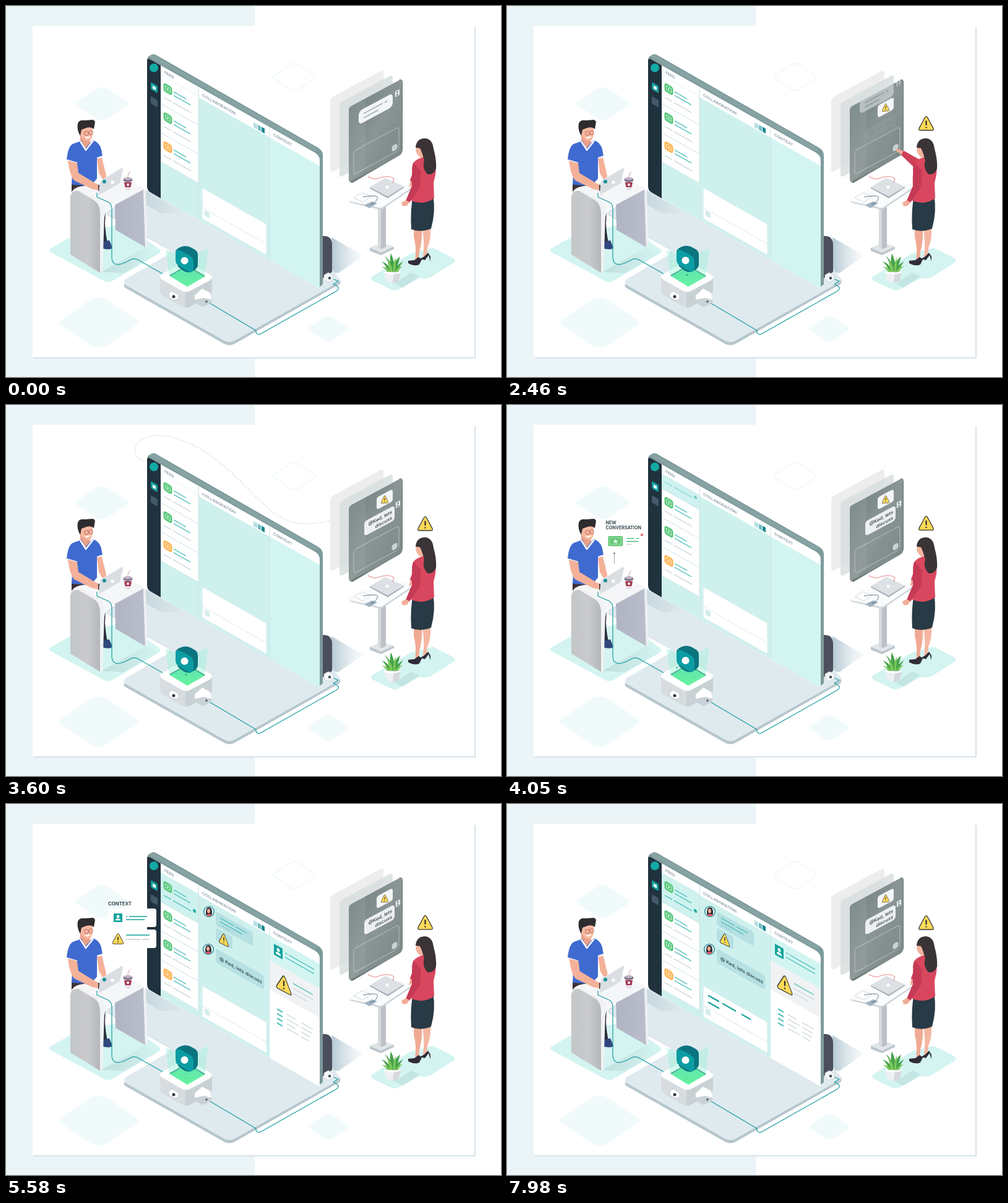
An HTML page that plays this animation: 800x600 px, repeating every 8000 ms.

```html
<!DOCTYPE html>
<html lang="en">
<head>
<meta charset="utf-8">
<title>Team workspace</title>
<style>
html, body { margin: 0; height: 100%; overflow: hidden; background: #fff; }
svg { display: block; width: 800px; height: 600px; font-family: Inter, sans-serif; }
path { stroke-linejoin: round; }
</style>
</head>
<body>
<svg viewBox="0 0 800 600">
<defs>
  <linearGradient id="legFill"><stop stop-color="#c4c6c8"/><stop offset=".55" stop-color="#c9cacc"/><stop offset="1" stop-color="#b3b5b9"/></linearGradient>
  <linearGradient id="backLeg"><stop stop-color="#b0b4c3"/><stop offset="1" stop-color="#babecb"/></linearGradient>
  <linearGradient id="glass" x2="1" y2="1"><stop stop-color="#738282"/><stop offset=".5" stop-color="#8a9594"/><stop offset="1" stop-color="#7c8a89"/></linearGradient>
  <linearGradient id="beam" x2="0" y2="1"><stop stop-color="#a9f1e4" stop-opacity=".5"/><stop offset="1" stop-color="#7df3c3" stop-opacity=".35"/></linearGradient>
  <linearGradient id="glow" x2="0" y2="1"><stop stop-color="#3bd693"/><stop offset="1" stop-color="#5af58d"/></linearGradient>
  <linearGradient id="shade"><stop stop-color="#b3c8d2"/><stop offset="1" stop-color="#e6eff3" stop-opacity=".3"/></linearGradient>
  <linearGradient id="floorShade"><stop stop-color="#9fb9c0" stop-opacity=".75"/><stop offset="1" stop-color="#9fb9c0" stop-opacity="0"/></linearGradient>
  <clipPath id="feedClip"><path d="M21 15H82V215H21Z"/></clipPath>
  <clipPath id="tabletClip"><rect width="86" height="122" rx="5"/></clipPath>
  <mask id="reveal" maskUnits="userSpaceOnUse" x="0" y="0" width="800" height="600">
    <path id="revealPath" pathLength="1" fill="none" stroke="#fff" stroke-width="6"/>
  </mask>
  <g id="warn">
    <path d="M-1.9-10Q0-12.6 1.9-10L11.4 7.600Q12.800 11 9.500 11H-9.500Q-12.800 11-11.4 7.600Z" fill="#ffda57" stroke="#3b3a38" stroke-width="1.3"/>
    <path d="M0-4.5V3M0 5.400V7.600" stroke="#2f2f30" stroke-width="2.2"/>
  </g>
  <g id="person">
    <rect x="-7" y="-7" width="14" height="14" rx="1" fill="#16a39c"/>
    <circle cy="-2" r="2.4" fill="#fff"/><path d="M-4.2 4.3Q-4 .8 0 1.2Q4 .8 4.2 4.3Z" fill="#fff"/>
  </g>
  <g id="avatar">
    <circle r="9" fill="#177f88"/><circle r="7.7" fill="#e6f8f7"/>
    <path d="M-4.8 5Q-6-7 0-7Q6-7 4.8 5Z" fill="#302d33"/>
    <ellipse cx="-.5" cy="-1" rx="2.4" ry="3.6" fill="#f4b39b"/>
    <path d="M-4.500 6Q-2 3 0 3.500Q3 3 4.500 6Q0 9-4.500 6Z" fill="#dc4f65"/>
  </g>
</defs>

<path d="M0 0H402V600H0Z" fill="#ebf4f6"/>
<path d="M45 34H759V570H45Z" fill="#d7e4ea"/>
<path d="M43 32H757V568H43Z" fill="#fff"/>
<g id="diamonds"></g>

<!-- floors -->
<g fill="#d3f4f0">
  <path d="M72 392L112 369L190 352L246 392Q253 396 246 401L173 444Q165 449 157 444L72 398Q68 395 72 392Z"/>
  <path d="M592 437L655 400L690 391L723 408Q729 412 722 416L687 438Q680 442 668 440L635 458Q628 462 621 458L592 444Q588 440 592 437Z"/>
</g>
<path d="M155 430L225 390L247 400L190 432Z" fill="url(#floorShade)" opacity=".5"/>
<path d="M526 374L577 404L537 432L526 430Z" fill="url(#shade)"/>

<!-- stage -->
<path d="M193 448L262 405L265 395L164 338V332L225 298L510 405L537 440Q543 444 539 450L370 546Q361 551 352 546L193 456Q188 452 193 448Z" fill="#b6c6cd"/>
<path d="M193 442L262 402Q268 398 262 393L160 335L225 298L510 405L537 438Q543 442 537 447L370 541Q361 546 352 541L193 451Q188 446 193 442Z" fill="#dfeaef"/>
<path d="M226 299L290 335L250 335L224 320Z" fill="url(#floorShade)" opacity=".5"/>
<path d="M512 372Q526 371 527 385V430L512 440Z" fill="#4b4e5c"/>

<!-- main screen -->
<path d="M228 88Q228 82 233 80Q238 76 244 80L504 229Q512 234 512 241V450L506 455L500 250Z" fill="#7e9b9c"/>
<path d="M231 82L238 79L504 231L499 235Z" fill="#88a3a3"/>
<g transform="matrix(1 .567 0 1 229 84)">
  <path d="M4 0H270Q278 0 278 8V215H5Q-1 215-1 208V5Q-1 0 4 0Z" fill="#fff"/>
  <path d="M4 0H21V215H5Q-1 215-1 208V5Q-1 0 4 0Z" fill="#20323e"/>
  <path d="M21 15H82V215H21ZM83 17H197V215H83Z" fill="#cff1ee"/>
  <path d="M197 17H278V215H197Z" fill="#d3f5f2"/>
  <path d="M82.5 0V215M197 0V215" stroke="#c6dcdf" stroke-width=".8"/>
  <g font-size="6.2" font-weight="600" fill="#86949f">
    <text x="27" y="10">FEED</text><text x="88" y="12" letter-spacing=".1">COLLABORATION</text><text x="203" y="11">CONTEXT</text>
  </g>
  <path d="M171 7H177V15H171Z" fill="#b5dfe2"/><path d="M178 7H183V15H178Z" fill="#6fbcc0"/><path d="M184 7H189V15H184Z" fill="#17888c"/>
  <rect x="5" y="36" width="11" height="12" rx="2" fill="#139f9d"/><path d="M8 40H13V45H8Z" fill="#fff"/>
  <rect x="5" y="59" width="11" height="12" rx="2" fill="#43596a"/>
  <g clip-path="url(#feedClip)"><g id="oldCards"></g><g id="newCard"></g></g>
  <g>
    <rect x="88" y="160" width="104" height="50" rx="2" fill="#fff" stroke="#d4e9eb" stroke-width=".7"/>
    <path d="M88 192H192" stroke="#cfe2e5" stroke-width=".8"/>
    <rect x="92" y="194" width="8" height="9" rx="2" fill="#d3edec"/>
    <g id="draft"></g>
  </g>
  <g id="context"></g>
  <g id="messageA">
    <rect x="110" y="27" width="60" height="23" rx="4" fill="#b6e0e2"/>
    <g id="messageLines"></g>
  </g>
  <g id="messageB"><rect x="110" y="53" width="27" height="21" rx="4" fill="#b6e0e2"/></g>
  <g id="messageC">
    <rect x="110" y="87" width="78" height="23" rx="4" fill="#b6e0e2"/>
    <text x="116" y="102" font-size="7.4" font-weight="500" fill="#22343f">@ Ked, lets discuss</text>
  </g>
</g>
<circle cx="239" cy="100" r="7" fill="#13aaa5"/>
<g id="messageIcons">
  <use href="#avatar" x="328" y="174"/><use href="#avatar" x="327" y="235"/>
  <use href="#warn" transform="translate(352 219) skewY(25) scale(.65 .78)"/>
</g>
<use id="contextWarn" href="#warn" transform="translate(449 291) skewY(28) scale(1 1.12)"/>

<!-- cables and connector -->
<path d="M325 478L401 523Q405 525 404 528Q406 533 412 530L534 461Q540 457 535 453L529 450L537 445L523 439" fill="none" stroke="#1a9d9e" stroke-width="1.2"/>
<path d="M514 435L521 431L529 436V443L521 447L514 443Z" fill="#f3f5f6" stroke="#c2cbd0" stroke-width=".6"/>
<circle cx="523" cy="440" r="2.2" fill="#42505c"/>

<!-- projector -->
<path d="M249 438V461Q249 466 255 469L282 485Q290 490 298 486L327 469Q333 466 333 460V438Z" fill="#d6dcdf"/>
<path d="M290 462L333 438V460Q333 466 327 469L298 486Q294 488 290 488Z" fill="#c8d1d4"/>
<path d="M253 433L283 416Q291 412 299 416L329 434Q337 439 329 444L299 460Q291 465 283 460L253 443Q245 438 253 433Z" fill="#fff"/>
<path d="M264 436L292 420L322 437L293 454Z" fill="url(#glow)"/>
<path d="M265 436L284 425M301 425L321 437" stroke="#157466" stroke-width="1.5"/>
<path d="M263 464L269 461L279 467V474L272 476L263 471Z" fill="#fff" stroke="#aab0b8" stroke-width=".6"/><circle cx="271" cy="470" r="2.5" fill="#33373d"/>
<path d="M305 468L317 457L330 464L332 477L318 486L305 479Z" fill="#fff"/><path d="M305 475L320 472L332 475V480L318 487L305 480Z" fill="#c9d2d6"/><circle cx="324" cy="478" r="1.8" fill="#53606a"/>
<path d="M258 394L292 409L293 454L264 437Z" fill="url(#beam)"/><path d="M327 391L292 409L293 454L321 437Z" fill="url(#beam)"/>
<g id="dots" fill="#13a882"><circle r="1.3"/><circle r="1.3"/></g>
<g id="cube">
  <path d="M274 397Q277 391 287 389Q293 388 299 391L306 395Q310 398 310 403V420Q309 425 304 428L298 431Q293 432 287 429L278 422Z" fill="#0b747f"/>
  <path d="M274 399Q275 393 282 396L297 404Q303 408 303 414V425Q302 433 295 430L280 421Q274 418 274 411Z" fill="#0c9da3"/>
  <circle cx="288.5" cy="412.5" r="6" fill="#fff"/>
</g>

<!-- man at desk -->
<path d="M151 330H161L160 352Q161 370 164 382L153 384Z" fill="#2e303c"/>
<path d="M153 374L158 381L167 379L172 391Q168 396 153 391Z" fill="#30477e"/>
<path d="M176 321L222 296L225 390L177 362Z" fill="url(#backLeg)"/>
<path d="M222 296L226 299L229 388L225 390Z" fill="#eef0f3"/>
<path d="M106 287H148V302H106Z" fill="#3d3135"/>
<path d="M104 307Q106 293 125 291L190 278L222 294Q223 297 220 298L166 327Q161 330 159 342L150 330Z" fill="#f5f6f8"/>
<path d="M104 308Q106 296 122 300L144 312Q154 318 154 334L153 432L104 402Z" fill="url(#legFill)"/>
<path d="M122 298L148 312Q160 319 159 338L156 429L152 433V340Q153 321 142 314L118 300Z" fill="#f0f2f3"/>
<path d="M147 302V309L165 317Q171 320 171 328V408Q172 419 183 418Q192 416 202 410Q209 407 216 412L253 433" fill="none" stroke="#1a9d9e" stroke-width="1.2"/>
<path d="M120 208L134 212L137 224L128 234L120 222Z" fill="#eaa089"/>
<path d="M108 223L122 218L128 230L140 217Q151 220 154 232L156 243L147 247V279L137 291L106 289Q108 264 105 250L98 249Q100 227 108 223Z" fill="#3f6acf"/>
<path d="M120 219L129 233L141 218" fill="none" stroke="#fff" stroke-width="2.4"/>
<path d="M98 249L115 254M147 246L156 243" stroke="#f2f5fd" stroke-width="2"/>
<path d="M119 198Q121 190 134 191L140 196V208Q139 218 132 218Q122 217 119 203Z" fill="#f7baa2"/>
<path d="M116 190Q118 184 127 185L141 184L144 187L142 199Q138 195 130 197L122 200L120 210Q114 200 116 190Z" fill="#2e2c2f"/>
<g fill="none" stroke="#a74e49" stroke-width=".8"><circle cx="130" cy="206" r="3.4"/><circle cx="137" cy="205" r="3.2"/></g>
<path d="M127 212Q132 217 137 211Z" fill="#fff"/>
<g id="manArms" fill="#f4b199">
  <path d="M100 250L115 254L117 270L145 287L154 291L149 298L139 296L110 282Q103 274 100 250Z"/>
  <path d="M147 247L155 245L161 270Q164 280 157 282L150 270Z"/>
</g>
<path d="M149 289L153 290V301L149 299Z" fill="#33363e"/>
<path d="M152 283L187 262Q190 262 189 265L184 287L150 306Z" fill="#dadde2" stroke="#f1f3f5" stroke-width=".7"/>
<circle cx="159" cy="284" r="3" fill="#15939a"/><circle cx="172" cy="285" r="2.7" fill="#fff"/>
<path d="M190 281L193 297Q197 300 201 297L204 281Z" fill="#e4dfe8"/>
<path d="M191 285L192.500 293H201.500L203 285Z" fill="#a63b54"/><circle cx="197" cy="289" r="2" fill="#fff"/>
<ellipse cx="197" cy="281" rx="7.5" ry="3.7" fill="#796b83"/><ellipse cx="197" cy="279.500" rx="6" ry="2.500" fill="#b9afc2"/><path d="M196 280L198 271L201 268" fill="none" stroke="#d6b8bc" stroke-width="1.2"/>

<!-- tablet -->
<g transform="matrix(1 -.54 0 1 524 149)"><rect width="86" height="121" rx="5" fill="#ededee"/></g>
<g transform="matrix(1 -.54 0 1 539 157)"><rect width="86" height="121" rx="5" fill="#d9dfdf" opacity=".85"/></g>
<path d="M636 119Q641 118 641 124V232Q641 238 635 242L560 286L556 285Z" fill="#687777"/>
<g transform="matrix(1 -.54 0 1 554 164)">
  <rect width="86" height="122" rx="5" fill="url(#glass)"/>
  <path d="M0 0H27V115L0 122Z" fill="#a4adad" opacity=".25"/>
  <g clip-path="url(#tabletClip)">
    <g id="firstBubble">
      <rect x="16" y="15" width="55" height="22" rx="6" fill="#f2f5f6"/>
      <path d="M24 23H55M58 23H62M24 30H48" stroke="#aab4b6" stroke-width="2"/>
      <rect x="75" y="15" width="7" height="9" fill="#eef2f2"/><circle cx="78.5" cy="18" r="1.5" fill="#78898a"/><path d="M76 23Q78.5 18 81 23Z" fill="#78898a"/>
    </g>
    <g id="alertBubble"><rect x="45" y="10" width="26" height="20" rx="4" fill="#f3f5f6"/><use href="#warn" transform="translate(58 20) skewY(24) scale(.48 .54)"/></g>
    <g id="textBubble">
      <rect x="25" y="38" width="49" height="24" rx="5" fill="#eceff0"/>
      <g font-size="7.5" font-weight="500" fill="#28363f" text-anchor="end"><text x="70" y="49">@Ked, lets</text><text x="70" y="58.5">discuss</text></g>
      <rect x="76" y="35" width="7" height="9" fill="#eef2f2"/><circle cx="79.5" cy="38" r="1.5" fill="#78898a"/><path d="M77 43Q79.5 38 82 43Z" fill="#78898a"/>
    </g>
  </g>
  <rect x="8" y="75" width="73" height="38" rx="4" fill="none" stroke="#c3cccc" stroke-width=".8"/>
  <rect x="69.5" y="100" width="9" height="10" rx="4" fill="#c9d1d2"/>
</g>

<!-- side table -->
<path d="M588 391L607 384L627 390V393L606 403L588 396Z" fill="#bdc6cc"/><path d="M588 391L607 383L627 389L606 399Z" fill="#e1e6e9"/>
<path d="M601 320H614V390L607 393L601 390Z" fill="#bcc1c7"/><path d="M601 320H606V392L601 390Z" fill="#d7dade"/>
<path d="M555 314L606 287L655 290V297L609 328Q604 331 599 328L556 318Z" fill="#cdd5da"/>
<path d="M555 312L606 285L655 288V294L609 325Q604 328 599 325L556 316Z" fill="#fafbfc"/>
<path d="M588 293L613 278L643 292L617 308Z" fill="#dde1e5"/><path d="M588 293L617 308L643 292V294L617 311L588 295Z" fill="#a9b2ba"/><circle cx="616" cy="293" r="2.5" fill="#fff"/>
<path d="M562 310L575 302L590 308L577 317Z" fill="#fff" stroke="#c5ced5" stroke-width=".8"/><path d="M579 322L592 316L600 319L587 327Z" fill="#9fb3c2"/><path d="M577 309Q604 304 600 312T589 321" fill="none" stroke="#415b69" stroke-width=".8"/>
<path d="M586 270V277L597 280Q618 272 627 279L625 286" fill="none" stroke="#e38683"/>
<path d="M582 273L589 269V273L582 277Z" fill="#fff"/>

<!-- woman -->
<g id="raisedArm">
  <path d="M636 233L628 230L630 235L637 240L643 241L645 236Z" fill="#f3ad98"/>
  <path d="M641 234L666 248L676 255L670 267L660 263L637 241Z" fill="#cf4059"/>
</g>
<path d="M659 360H672Q673 381 668 398L667 413H661Q664 390 659 374Z" fill="#f0aa94"/><path d="M673 360H686Q687 378 681 391L680 405H674Q677 385 673 360Z" fill="#f5b7a1"/>
<path d="M650 412L660 411L667 406L672 410L668 418Q661 422 650 416ZM669 409L676 405L682 399L686 405V413L683 403L677 411Z" fill="#302c38"/>
<path d="M658 306H690Q695 331 687 360Q670 367 655 361Q653 329 658 306Z" fill="#273a45"/>
<path d="M664 223Q670 218 680 226L677 247L668 244L664 239L662 234Z" fill="#f4b49e"/>
<path d="M662 250Q675 241 690 247Q696 250 694 273L691 286L692 311Q675 323 655 315L658 285L656 263Q657 253 662 250Z" fill="#d9475f"/>
<path d="M658 253Q655 275 656 291L646 315L652 318L669 293L671 267Z" fill="#c53a55"/>
<path d="M646 314L639 318L641 324L648 323L652 317Z" fill="#f3ad98"/>
<path d="M662 229Q663 215 676 214Q689 214 691 231Q696 249 695 263Q691 274 681 272Q672 262 676 250Q672 235 669 230Z" fill="#3a3436"/>
<use id="alarm" href="#warn"/>

<!-- plant -->
<path d="M628 449L655 431L668 437L641 456Z" fill="#b9dedd" opacity=".6"/>
<g fill="#45a34b"><path d="M617 430Q616 421 607 413Q619 417 623 430ZM620 430Q620 415 612 404Q624 414 626 430ZM622 430Q619 412 622 400Q629 414 628 430ZM625 430Q626 413 637 405Q633 418 631 430ZM628 430Q631 418 642 413Q635 421 633 430Z"/><path d="M616 430Q613 424 607 422Q616 421 621 430ZM621 430Q617 419 617 411Q625 420 625 430ZM626 430Q625 415 630 407Q630 420 629 430ZM629 430Q633 421 641 421Q635 425 634 430Z" fill="#7cc65a"/></g>
<path d="M611 430H638L635 444Q625 451 614 444Z" fill="#eff0f1"/><path d="M627 430H638L635 444Q630 448 625 448Z" fill="#d5d8dc"/><path d="M611 430Q624.500 436 638 430" fill="none" stroke="#fff" stroke-width="2"/>

<path id="route" d="M522 187C480 197 455 192 430 172C395 143 375 115 335 85C300 58 255 43 228 52C202 61 203 84 224 91" fill="none" stroke="#c8d1d6" stroke-width="1.1" stroke-dasharray="2 2.4" mask="url(#reveal)"/>

<g id="conversation">
  <g font-size="7.5" font-weight="600" fill="#24343d"><text x="159" y="190">NEW</text><text x="159" y="199">CONVERSATION</text></g>
  <rect x="159" y="205" width="60" height="28" rx="4" fill="#fff"/>
  <rect x="163" y="210" width="25" height="17" rx="2" fill="#67c878"/><rect x="166" y="213" width="19" height="11" fill="none" stroke="#a5e2ae"/><path d="M175.500 215L177 218H180L177.500 220L178.500 223L175.500 221L172.500 223L173.500 220L171 218H174Z" fill="#e3f7e4"/>
  <path d="M194 214H207M210 214H215M194 219H214" stroke="#5cc382" stroke-width="1.7"/><path d="M194 224H203" stroke="#cfd9dc" stroke-width="1.5"/>
  <circle cx="220" cy="208" r="2.4" fill="#ef7886"/>
  <path d="M173.500 239V257" stroke="#7c8b92" stroke-width=".8"/><circle cx="173.500" cy="239" r="1.4" fill="#586972"/>
</g>
<g id="contextCards">
  <text x="0" y="-36" font-size="7.8" font-weight="600" fill="#24343d">CONTEXT</text>
  <g id="contextPlates"><rect y="-31" width="78" height="30" rx="4"/><rect y="3" width="78" height="30" rx="4"/></g>
  <use href="#person" x="16" y="-16"/><use href="#warn" transform="translate(16 18) scale(.75)"/>
  <path d="M29-18H31M34-18H63M29-13H59M29 12H67" stroke="#16a39c" stroke-width="1.7"/>
  <path d="M29 19H52M55 19H67" stroke="#c4ced3" stroke-width="1.6"/>
</g>
</svg>
<script>
const $ = id => document.getElementById(id);
const TEAL = '#4bbfba', GREY = '#cbd6da';
const dash = (x1, x2, y, color = TEAL, width = 1.5) =>
  `<path d="M${x1} ${y}H${x2}" stroke="${color}" stroke-width="${width}"/>`;

const diamond = (x, y, w, h, style) =>
  `<path transform="translate(${x} ${y}) scale(${w} ${h})" d="M-.92-.12L-.2-.9Q0-1.08.2-.9L.92-.12Q1.05 0 .92.12L.2.9Q0 1.08-.2.9L-.92.12Q-1.05 0-.92-.12Z" vector-effect="non-scaling-stroke" ${style}/>`;
const pale = 'fill="#f0fafb"';
$('diamonds').innerHTML = diamond(155, 158, 44, 27, pale) + diamond(150, 512, 65, 41, pale) +
  diamond(521, 522, 33, 21, pale) + diamond(466, 115, 35, 22, 'fill="none" stroke="#e3f5f6"');

const card = (y, color, active) => `<g transform="translate(0 ${y})">
  <path d="M21 0H82V47H21Z" fill="${active ? '#cff2ef' : '#fff'}" stroke="#c9dfe2" stroke-width=".6"/>
  <rect x="25.500" y="10" width="14" height="14" rx="4" fill="${color}"/>
  <rect x="28.500" y="13.500" width="8" height="7" rx="1" fill="none" stroke="#fff" stroke-opacity=".7"/>
  <circle cx="32.500" cy="17" r="1.3" fill="#fff"/>
  ${dash(42, 62, 16)}${dash(42, 69, 22)}
  ${dash(26, 38, 34, active ? TEAL : GREY)}${dash(41, 70, 34, active ? TEAL : GREY)}
  ${active ? '<circle cx="75.500" cy="31" r="2.6" fill="#22aaa5"/>' : ''}</g>`;
const GREEN = '#55c878', ORANGE = '#ffb34f';
$('oldCards').innerHTML = [GREEN, GREEN, ORANGE].map((color, i) => card(15 + 47 * i, color)).join('');
$('newCard').innerHTML = card(15, GREEN, true);

$('messageLines').innerHTML = dash(117, 139, 34) + dash(142, 160, 34) + dash(117, 153, 40) + dash(117, 134, 45, '#8acbce');
$('context').innerHTML = `<path d="M197 57H278V215H197Z" fill="#fff"/><path d="M197 57H278V104H197Z" fill="#f0f2f3"/>
  <use href="#person" transform="translate(211 35) scale(1 1.25)"/>` +
  dash(222, 226, 31) + dash(228, 269, 31) + dash(222, 269, 38) +
  dash(235, 267, 73) + dash(235, 267, 81, GREY) + dash(235, 258, 89, GREY) +
  [0, 1, 2, 3].map(i => {
    const y = 129 + 7.5 * i;
    return dash(209, 218, y, TEAL, 2.4) + dash(225, 239 + i % 2 * 5, y, GREY) + dash(248, 267 - i * 2, y, GREY);
  }).join('');

const draftSegments = [[96, 114, 171], [119, 141, 171], [150, 165, 171], [96, 114, 182]];
$('revealPath').setAttribute('d', $('route').getAttribute('d'));

const clamp = x => Math.max(0, Math.min(1, x));
const linear = (t, a, b) => clamp((t - a) / (b - a));
const ease = (t, a, b) => { const x = linear(t, a, b); return x * x * (3 - 2 * x); };
const pop = (t, a, b) => { const x = linear(t, a, b) - 1; return 1 + 2.7 * x ** 3 + 1.7 * x * x; };
const mix = (a, b, x) => a + (b - a) * x;
const move = (id, transform) => $(id).setAttribute('transform', transform);
const fade = (id, value) => { $(id).style.opacity = value; };
const scaleAt = (x, y, s) => `translate(${x} ${y}) scale(${s}) translate(${-x} ${-y})`;

function render(t) {
  const bob = Math.cos((t - 3600) / 2200 * 2 * Math.PI);
  move('cube', `translate(0 ${bob * 1.4 + .3})`);
  [...$('dots').children].forEach((dot, i) => {
    const p = (t / 1200 + .45 + i * .5) % 1;
    dot.setAttribute('cx', i ? 273 + 5 * p : 291);
    dot.setAttribute('cy', (i ? 432 : 446) - 22 * p);
    dot.style.opacity = t < 100 ? 0 : Math.sin(p * Math.PI);
  });

  // Woman sends an alert, then a message.
  move('alarm', `translate(677.5 ${191 + bob}) scale(${pop(t, 150, 650)})`);
  const lift = ease(t, 1700, 2150) * (1 - ease(t, 2650, 3050));
  move('raisedArm', `translate(668 258) rotate(${mix(-100, 0, lift)}) scale(${mix(.8, 1, lift)}) translate(-668 -258)`);
  const scroll = ease(t, 1900, 2300), sent = ease(t, 2400, 2850);
  move('firstBubble', `translate(0 ${-16 * scroll - 25 * sent})`);
  fade('firstBubble', (1 - .5 * scroll) * (1 - sent));
  move('alertBubble', `translate(0 ${mix(12, 0, sent) + 14 * (1 - scroll)})`);
  fade('alertBubble', scroll);
  move('textBubble', `translate(0 ${14 * (1 - sent)})`);
  fade('textBubble', sent);

  const head = ease(t, 2700, 3230), tail = ease(t, 3620, 4040);
  $('revealPath').setAttribute('stroke-dasharray', `0 ${tail} ${Math.max(0, head - tail)} 2`);
  $('route').style.visibility = head > tail ? 'visible' : 'hidden';

  // The conversation arrives on the main screen.
  const inserted = ease(t, 3850, 4250);
  move('oldCards', `translate(0 ${47 * inserted})`);
  move('newCard', `translate(0 ${-47 * (1 - inserted)})`);
  fade('newCard', inserted);
  [['messageA', 4150], ['messageB', 4300], ['messageC', 4450]].forEach(([id, start]) => {
    const p = ease(t, start, start + 300);
    move(id, `translate(0 ${10 * (1 - p)})`);
    fade(id, p);
  });
  fade('messageIcons', ease(t, 4250, 4600));
  fade('context', ease(t, 4350, 4750));
  fade('contextWarn', ease(t, 4450, 4800));

  // Notices above the laptop.
  move('conversation', scaleAt(173, 257, pop(t, 3900, 4350) * (1 - ease(t, 5020, 5220))));
  const leave = ease(t, 6700, 6930), shrink = linear(t, 6930, 7220);
  const x = mix(mix(165, 153.5, leave), 127, shrink), y = mix(200, 204, shrink);
  const size = pop(t, 5180, 5550) * mix(mix(1, .9, leave), 0, shrink);
  move('contextCards', `translate(${x} ${y}) scale(${size})`);
  $('contextPlates').style.fill = `rgb(${[204, 209, 214].map(c => mix(255, c, leave))})`;

  // Man types a reply.
  const typing = linear(t, 7340, 7400);
  move('manArms', `translate(${typing * Math.sin(t / 55)} ${typing * .7 * Math.sin(t / 38)})`);
  const total = draftSegments.reduce((sum, [a, b]) => sum + b - a, 0);
  let left = total * linear(t, 7380, 7950);
  $('draft').innerHTML = draftSegments.map(([a, b, row]) => {
    const length = Math.min(b - a, Math.max(0, left));
    left -= b - a;
    return length ? dash(a, a + length, row, '#16a39c', 2.6) : '';
  }).join('');
}

function frame(now) {
  render(now % 8000);
  requestAnimationFrame(frame);
}
render(0);
requestAnimationFrame(frame);
</script>
</body>
</html>
```
